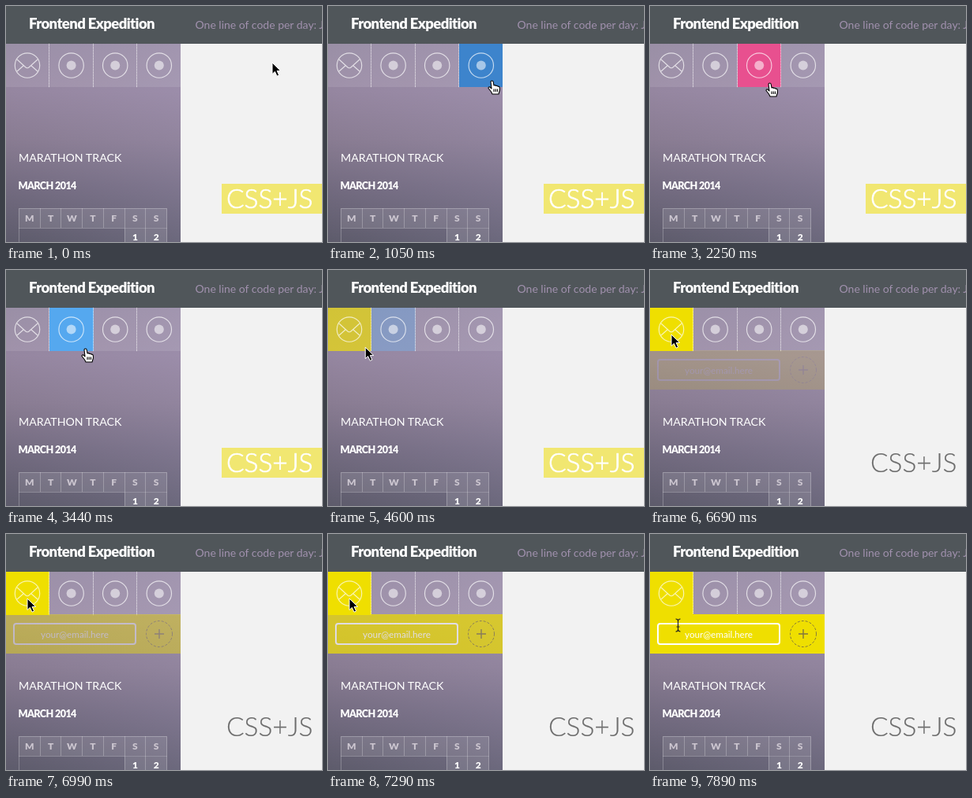
Recreate the animation shown at these times as an HTML page. Size 400 by 300 pixels, loop 8000 ms.

```html
<!DOCTYPE html>
<html lang="en">
<head>
<meta charset="utf-8">
<title>Frontend Expedition</title>
<style>
  html, body { margin: 0; width: 100%; height: 100%; overflow: hidden; background: #f2f2f2; }
  svg { display: block; width: 400px; height: 300px; font-family: Lato, sans-serif; }
  .bold { font-weight: 900; fill: #fff; letter-spacing: -.6px; }
  .icon { fill: none; stroke: #fff; stroke-opacity: .7; stroke-width: 1.15; }
  .dots { stroke: #fff; stroke-opacity: .9; stroke-dasharray: 1 1; }
  .grid { fill: none; stroke: #fff; stroke-opacity: .25; }
  .cell { fill: #fff; fill-opacity: .1; }
  .day { font-size: 12px; font-weight: 900; text-anchor: middle; fill: #cbc5cf; }
  .date { fill: #fff; }
  .arrow { fill: #000; stroke: #fff; stroke-width: 1; }
  .hand { fill: #fff; stroke: #000; stroke-width: 1.1; stroke-linejoin: round; }
  .beam { fill: none; stroke: #222; stroke-width: 1.2; }
</style>
</head>
<body>
<svg viewBox="0 0 400 300">
  <defs>
    <linearGradient id="dusk" x1="0" y1="0" x2="0" y2="1">
      <stop offset="0" stop-color="#8f829c"/>
      <stop offset=".24" stop-color="#9586a0"/>
      <stop offset=".48" stop-color="#897c92"/>
      <stop offset=".72" stop-color="#736b80"/>
      <stop offset="1" stop-color="#5d5b6b"/>
    </linearGradient>
    <linearGradient id="haze">
      <stop offset="0" stop-color="#c0b4e0" stop-opacity="0"/>
      <stop offset="1" stop-color="#c0b4e0" stop-opacity=".15"/>
    </linearGradient>
  </defs>

  <rect width="400" height="300" fill="#f2f2f2"/>
  <rect y="48" width="221" height="252" fill="url(#dusk)"/>
  <rect y="48" width="221" height="252" fill="url(#haze)"/>
  <rect width="400" height="48" fill="#50565a"/>
  <text class="bold" x="29" y="29" font-size="18.5">Frontend Expedition</text>
  <text x="239.5" y="29" font-size="14" fill="#a191ae">One line of code per day: J</text>

  <g id="tiles"></g>

  <g id="panel">
    <rect y="102" width="221" height="50" fill="#efdf00"/>
    <rect x="10" y="114" width="154" height="26" rx="3" fill="none" stroke="#fff" stroke-width="2"/>
    <text x="87" y="132" font-size="11.7" fill="#fff" text-anchor="middle">your@email.here</text>
    <g fill="none" stroke="#81763f">
      <circle cx="194" cy="127" r="16.5" stroke-dasharray="3 2"/>
      <path d="M188 127h12M194 121v12" stroke-width="1.4"/>
    </g>
  </g>

  <text x="16" y="198" font-size="14.2" fill="#fff">MARATHON TRACK</text>
  <text class="bold" x="15.5" y="233" font-size="12.6">MARCH 2014</text>
  <g id="calendar">
    <rect class="cell" x="16" y="257" width="188" height="25"/>
    <rect class="cell" x="150" y="283" width="54" height="17"/>
    <path class="grid" d="M16.5 300V257.5H203.5V300M16 282.5H204"/>
  </g>

  <rect id="selection" x="273" y="226" width="127" height="38" fill="#f1e771"/>
  <text id="heading" x="279" y="257" font-size="33.4" font-weight="300">CSS+JS</text>

  <g id="cursor">
    <path class="arrow" d="M0 0V14.5L3.4 11.4L6 17.2L8.6 16L6.1 10.4H10.6Z"/>
    <path class="hand" d="M-2 1.5Q-2 0 -.5 0T1.2 1.5L2 6Q3.6 5 4.5 6.5Q6.2 5.7 7 7.2Q9 6.8 9.4 9V12L8 17H0L-1.5 14L-5 9.5Q-5 7.5 -3 8L-1 10ZM2 10.5V14M4.2 10.5V14M6.4 10.5V14"/>
    <path class="beam" d="M-3 -8Q0 -8 0 -5Q0 -8 3 -8M0 -6V6M-3 8Q0 8 0 5Q0 8 3 8M-2 2H2"/>
  </g>
</svg>

<script>
const LOOP = 8000;
const $ = id => document.getElementById(id);
const clamp = v => Math.max(0, Math.min(1, v));

// Pointer travel: first and last step in ms, step count, destination, tile left lit.
const START = { x: 337, y: 72, tile: -1 };
const MOVES = [
  { from: 150, to: 1050, steps: 7, x: 208, y: 95, tile: 3 },
  { from: 1650, to: 2250, steps: 5, x: 152, y: 98, tile: 2 },
  { from: 2850, to: 3440, steps: 5, x: 101, y: 100, tile: 1 },
  { from: 4150, to: 4750, steps: 5, x: 41, y: 98, tile: 0 },
  { from: 5650, to: 5950, steps: 3, x: 27, y: 82, tile: 0 },
  { from: 7740, to: 7890, steps: 2, x: 35.5, y: 116, tile: 0 }
];
const PANEL = { from: 6690, to: 7590, steps: 7 };

const TILES = [
  { color: '#efdf00', x: 0, width: 55 },
  { color: '#55a8ef', x: 55, width: 56 },
  { color: '#e8508f', x: 111, width: 55 },
  { color: '#3d84cc', x: 166, width: 55 }
];

$('tiles').innerHTML = TILES.map(({ color, x, width }, i) => {
  const cx = 27 + i * 55.6;
  const area = `x="${x}" y="48" width="${width}" height="55"`;
  const mark = i === 0
    ? '<path class="icon" d="M14 68L25 78Q27 79.5 29 78L40 68M14 83L22.5 75.5M40 83L31.5 75.5"/>'
    : `<circle cx="${cx}" cy="75.5" r="6" fill="#fff" fill-opacity=".55"/>`;
  const divider = i === 0 ? '' : `<path class="dots" d="M${x - .5} 48V103"/>`;
  return `<rect class="cell" ${area}/><rect class="glow" ${area} fill="${color}"/>
    ${divider}<circle class="icon" cx="${cx}" cy="75.5" r="15.7"/>${mark}`;
}).join('');

const columnWidth = 187 / 7;
$('calendar').innerHTML += [...'MTWTFSS'].map((day, i) => {
  const x = 16.5 + i * columnWidth, middle = x + columnWidth / 2;
  const line = i ? `<path class="grid" d="M${Math.floor(x) + .5} 257V${i > 4 ? 300 : 282}"/>` : '';
  const date = i > 4 ? `<text class="day date" x="${middle}" y="298">${i - 4}</text>` : '';
  return `${line}<text class="day" x="${middle}" y="274">${day}</text>${date}`;
}).join('');

const glows = document.querySelectorAll('.glow');
const shapes = [...$('cursor').children];

// Share of a change completed at time t, advancing in whole steps.
function progress({ from, to, steps }, t) {
  if (t < from) return 0;
  const interval = (to - from) / (steps - 1);
  return clamp((Math.floor((t - from) / interval + 1e-6) + 1) / steps);
}

function pointerAt(t) {
  let previous = START;
  let state = { x: START.x, y: START.y, lit: [0, 0, 0, 0] };
  for (const move of MOVES) {
    const p = progress(move, t);
    if (!p) break;
    const eased = p * p * (3 - 2 * p);
    const fade = clamp((p - .4) / .6);
    const lit = TILES.map((_, i) =>
      (previous.tile === i) * (1 - fade) + (move.tile === i) * fade);
    state = {
      x: previous.x + (move.x - previous.x) * eased,
      y: previous.y + (move.y - previous.y) * eased,
      lit
    };
    previous = move;
  }
  return state;
}

function render(t) {
  const { x, y, lit } = pointerAt(t);
  lit.forEach((value, i) => glows[i].setAttribute('opacity', value));

  const overLink = x > 55 && x < 221 && y < 103;
  const overField = x < 165 && y > 113;
  const active = overField ? 2 : overLink ? 1 : 0;
  shapes.forEach((shape, i) => shape.setAttribute('display', i === active ? 'inline' : 'none'));
  $('cursor').setAttribute('transform', `translate(${x} ${y})`);

  const selected = t < PANEL.from;
  const ink = selected ? '#fff' : '#6c6c6c';
  $('panel').setAttribute('opacity', progress(PANEL, t));
  $('selection').setAttribute('opacity', selected ? 1 : 0);
  $('heading').setAttribute('fill', ink);
  $('heading').setAttribute('stroke', ink);
  $('heading').setAttribute('stroke-width', selected ? .7 : .2);
}

let start;
function tick(now) {
  start ??= now;
  render((now - start) % LOOP);
  requestAnimationFrame(tick);
}
render(0);
requestAnimationFrame(tick);
</script>
</body>
</html>
```
